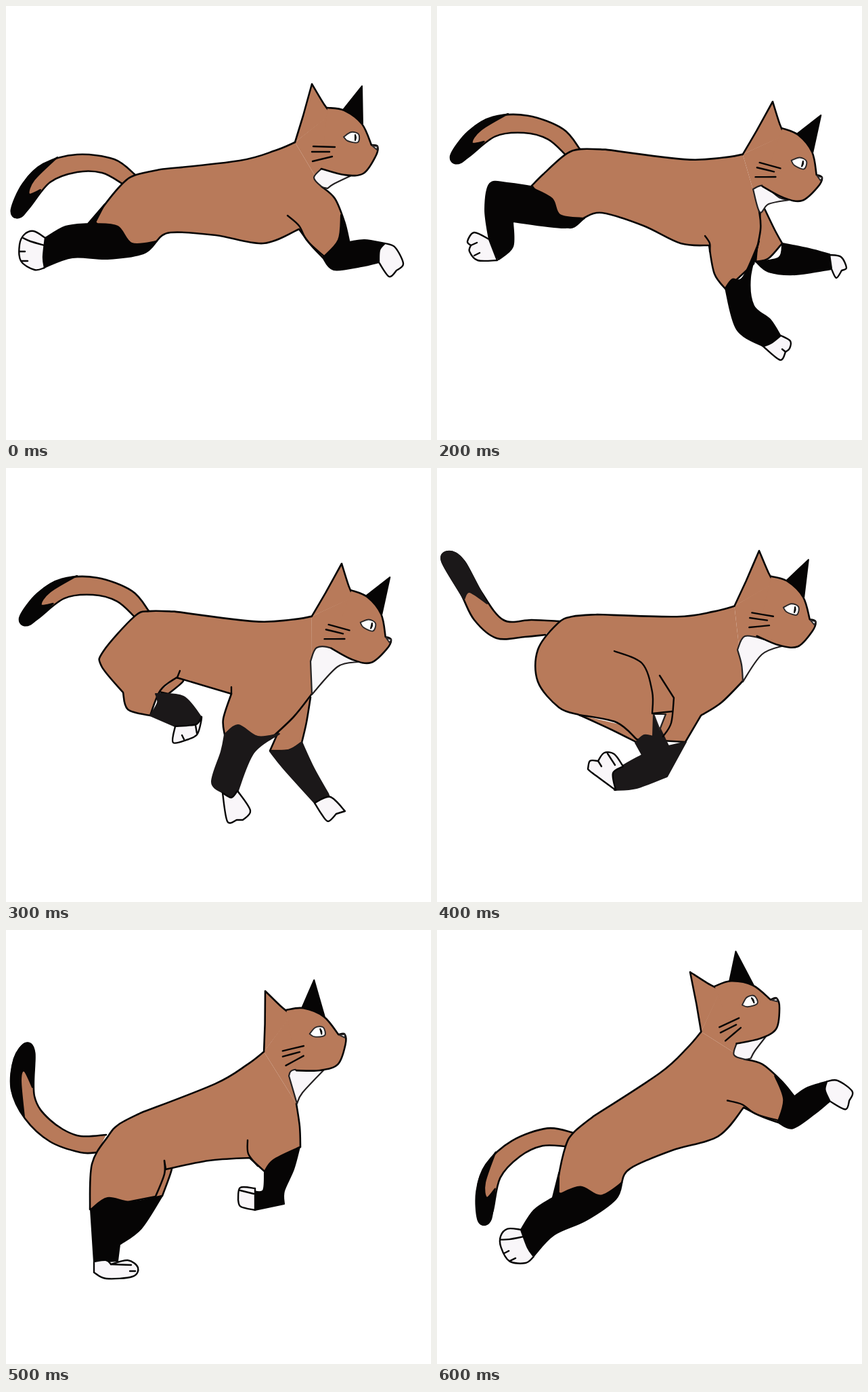
Animation of 628x640 px, one loop 700 ms. Source, as an HTML page:

```html
<!DOCTYPE html>
<html lang="en">
<head>
<meta charset="utf-8">
<title>Running cat</title>
<style>
html, body { margin: 0; width: 100%; height: 100%; overflow: hidden; background: #fff; }
svg { display: block; width: 628px; height: 640px; }
path { stroke-linejoin: round; stroke-linecap: round; }
</style>
</head>
<body>
<svg id="stage" viewBox="0 0 628 640"></svg>
<script>
const NS = 'http://www.w3.org/2000/svg';
const INK = '#060505', SOFT = '#1b1819', FUR = '#b87a5a', PALE = '#f9f6f9';

// fill, stroke, width
const STYLES = {
  fur: [FUR, INK, 2.6],
  patch: [FUR, 'none', 0],
  black: [INK, INK, 2],
  soft: [SOFT, SOFT, 2],
  paw: [PALE, INK, 2.4],
  bib: [PALE, '#242122', 2.2],
  eye: ['#fff', '#2b2728', 1.9],
  line: ['none', INK, 2.4]
};
const OPEN = ['fur', 'line'];

// Smooth curve through points; a slash makes the point before it a corner.
function curve(text) {
  let d = '', last = null;
  for (const run of text.split('/')) {
    const n = run.trim().split(/\s+/).map(Number);
    const p = last ? [last] : [];
    for (let i = 0; i < n.length; i += 2) p.push([n[i], n[i + 1]]);
    if (!last) d = 'M' + p[0];
    for (let i = 0; i < p.length - 1; i++) {
      const b = p[i], c = p[i + 1], a = p[i - 1] || b, e = p[i + 2] || c;
      const c1 = [0, 1].map(k => b[k] + (c[k] - a[k]) / 6);
      const c2 = [0, 1].map(k => c[k] - (e[k] - b[k]) / 6);
      d += `C${c1} ${c2} ${c}`;
    }
    last = p[p.length - 1];
  }
  return d;
}

function add(parent, tag, attrs) {
  const el = document.createElementNS(NS, tag);
  for (const k in attrs) el.setAttribute(k, attrs[k]);
  return parent.appendChild(el);
}

// Maps points around the ear tip, as the head is placed.
function placer(x, y, tilt) {
  const c = Math.cos(tilt * Math.PI / 180), s = Math.sin(tilt * Math.PI / 180);
  return text => text.replace(/(\d+) (\d+)/g, (_, px, py) => {
    const u = px - 452, v = py - 115;
    return `${x + u * c - v * s} ${y + u * s + v * c}`;
  });
}

// One drawing method per style, plus the body, whose back is the same in all poses.
function pen(g, place, back) {
  const p = {};
  for (const name in STYLES) {
    const [fill, stroke, width] = STYLES[name];
    p[name] = text => add(g, 'path', {
      d: curve(place(text)) + (OPEN.includes(name) ? '' : 'Z'),
      fill, stroke, 'stroke-width': width
    });
  }
  p.body = text => {
    p.fur(back('427 201 398 213 345 228 228 241/192 249 172 262 ') + text);
    const end = text.match(/\d+ \d+$/)[0];
    p.patch(back('427 201/481 158/468 244/') + end);
  };
  return p;
}

function head(p) {
  p.black('498 153/526 118/527 174');
  p.fur('427 201 439 162/452 115/470 145 481 159');
  p.fur('475 150 500 154 526 174 540 205/549 207 546 222 528 247 500 249 466 240');
  p.eye('541 206/549 207/548 212');
  p.eye('499 193 510 186 521 189 520 201 505 199 499 193');
  p.black('516 190 517 194 516 198');
  p.line('454 207 486 208');
  p.line('452 215 478 215');
  p.line('453 229 482 222');
}

function tailArch(p) {
  p.fur('191 249 160 226 105 219 55 233 25 262 8 300 16 312 33 299 65 260 105 245 142 246 172 262');
  p.black('76 223 38 246 14 284 9 308 25 309 51 271/34 277 42 256 76 223');
}

function tailUp(p) {
  p.fur('182 226 140 224 98 224 65 182 40 137 18 123 7 137 35 185 55 224 88 251 130 249 160 246');
  p.soft('74 200 40 137 18 123 7 137 40 194/48 183 74 200');
}

function tailHook(p) {
  p.fur('148 302 105 303 65 280 42 245 42 180 29 167 12 190 8 235 28 278 65 312 110 328 135 328');
  p.black('39 232 42 180 29 167 12 190 8 235 27 276/22 222 27 208 39 232');
}

function stretch(p) {
  p.body('140 301 131 318/180 360 222 347/243 334 310 338 380 350 433 329/450 352 468 371/488 360 507 347/500 318 486 284 466 266');
  p.black('146 292 121 321/88 325 58 342/56 386/98 371 150 373 203 365 223 347/186 350 165 325 131 321');
  p.paw('58 342 41 332 27 337 20 352 22 376 42 389 57 386/55 370 58 342');
  p.line('25 342 36 347 57 353');
  p.line('20 362 28 362');
  p.line('23 376 32 376');
  p.black('495 308 491 345 468 371/484 389 525 384 551 378/552 360 560 350/530 345 507 348/495 308');
  p.paw('560 350 575 356 587 380 577 390/566 399 551 378/552 360 560 350');
  p.line('416 309 433 324 445 346 470 369');
  p.bib('466 240 455 253 466 266 475 269/485 262 510 250');
}

function reach(p) {
  p.fur('484 299 499 330 510 350/490 372 471 377/478 300');
  p.black('510 350 550 358 580 366/583 388/530 396 490 392 471 377/505 371 510 350');
  p.paw('580 367 597 370 605 386 598 390/590 401 583 388');
  p.body('157 248 140 265/190 325 218 312/244 305 305 324 360 350 402 353/410 395 427 418/468 380/478 330 476 302');
  p.black('140 266 104 261 78 262 71 300 77 345/91 374/112 355 112 318/190 327 218 313/182 308 170 284 140 268');
  p.paw('77 344 55 334 45 347 50 353/48 362 60 375 89 375/77 344');
  p.line('50 353 59 349');
  p.line('55 368 63 364');
  p.black('476 347 463 400 468 442 492 462 508 487/482 502/443 477 426 416/436 403 452 400 476 347');
  p.paw('508 486 522 494 521 505 515 510/507 522 482 502/494 497 508 486');
  p.line('515 510 510 506');
  p.line('396 339 403 350 403 362');
  p.bib('467 270 483 265 505 282 520 286/490 292 477 304 467 270');
}

function land(p) {
  p.fur('450 338 444 375 437 405/418 416 390 417/402 390');
  p.soft('390 418 418 416 437 404/455 443 476 480/478 492 456 494/410 443 390 418');
  p.paw('456 494 479 485 501 506/488 510/476 521 466 510 456 494');
  p.fur('252 309 262 314 240 333/226 330');
  p.body('144 270 141 292 173 331/180 356 213 365/228 328 252 309/333 333/321 370 323 393/355 405 390 400/425 367 452 333');
  p.soft('221 333 262 337 289 368/281 378/250 381/213 365/224 346 221 333');
  p.paw('250 381 281 378 289 367 283 392 270 400/247 405 250 381');
  p.line('280 379 282 391');
  p.line('260 394 263 400');
  p.soft('323 393 343 379 372 396 404 392/366 420 342 478/330 488 320 479/304 463 318 418 323 393');
  p.paw('320 479 333 486 342 476/361 505 350 519/341 519/327 521 320 479');
  p.line('333 323 333 333');
  p.line('257 299 253 309');
  p.bib('450 285 459 265 482 266 520 286/490 293 452 334/450 285');
}

function gather(p) {
  p.fur('210 364 258 386 296 405/300 385');
  p.body('149 268 149 315 180 353 210 364/265 375 295 400/367 404/390 365/420 346 452 314');
  p.soft('293 405 306 394 319 396/320 364/342 410/368 404/340 455/295 472 262 475/260 450 303 423/293 405');
  p.paw('275 440 260 450 264 475/230 450 223 444/226 432 238 432/247 420 262 422 275 440');
  p.line('238 432 243 440');
  p.line('252 421 263 438');
  p.bib('320 363/338 363/329 386');
  p.line('262 270 303 288 318 330 318 362/347 359');
  p.line('329 306 350 339/346 376 334 396');
  p.bib('444 268 455 248 485 253 512 262/480 275 452 315/450 290 444 268');
}

function push(p) {
  p.fur('236 353/245 352 231 392/215 396');
  p.body('127 345 124 412/221 393/234 360 234 340/236 353/300 340 360 336/382 356/435 320/434 290 429 256');
  p.black('125 412 150 395 185 401 231 392/200 440 168 464/165 488/130 490/125 412');
  p.paw('130 489 148 487 155 493/180 487 195 498 187 511 148 514 130 505/130 489');
  p.line('155 493 185 494');
  p.line('191 503 183 503');
  p.black('382 356 395 339 434 320/425 353 411 385 411 404/368 413/365 385/380 384 382 356');
  p.paw('368 381 346 380 343 398/347 408 368 413/368 381');
  p.line('346 384 366 389');
  p.line('357 310 358 330 372 348');
  p.bib('418 215 426 206 470 206/438 240 430 256/418 215');
}

// Duration in ms, ear tip x and y, tilt, body, tail
const poses = [
  [200, 452, 115, 0, stretch, tailArch],
  [100, 496, 141, 13.4, reach, tailArch],
  [100, 496, 141, 13.4, land, tailArch],
  [100, 476, 122, 7.9, gather, tailUp],
  [100, 383, 90, -15, push, tailHook],
  [100, 374, 62, -26.7, stretch, tailArch]
];

const stage = document.getElementById('stage');
const total = poses.reduce((sum, p) => sum + p[0], 0);
const same = text => text;
let start = 0;

for (const [ms, x, y, tilt, body, tail] of poses) {
  const g = add(stage, 'g', {});
  const turn = placer(x, y, tilt);
  const tilted = pen(g, turn, same), fixed = pen(g, same, turn);
  tail(tail === tailArch ? tilted : fixed);
  body(body === stretch ? tilted : fixed);
  head(tilted);

  const from = start / total, to = (start + ms) / total;
  const keys = [[0, 0], [from, 1], [to, 0], [1, 0]];
  if (from === 0) keys.shift();
  if (to === 1) keys.splice(-2, 2, [1, 1]);
  g.animate(
    keys.map(([offset, opacity]) => ({ offset, opacity, easing: 'step-end' })),
    { duration: total, iterations: Infinity }
  );
  start += ms;
}
</script>
</body>
</html>
```
